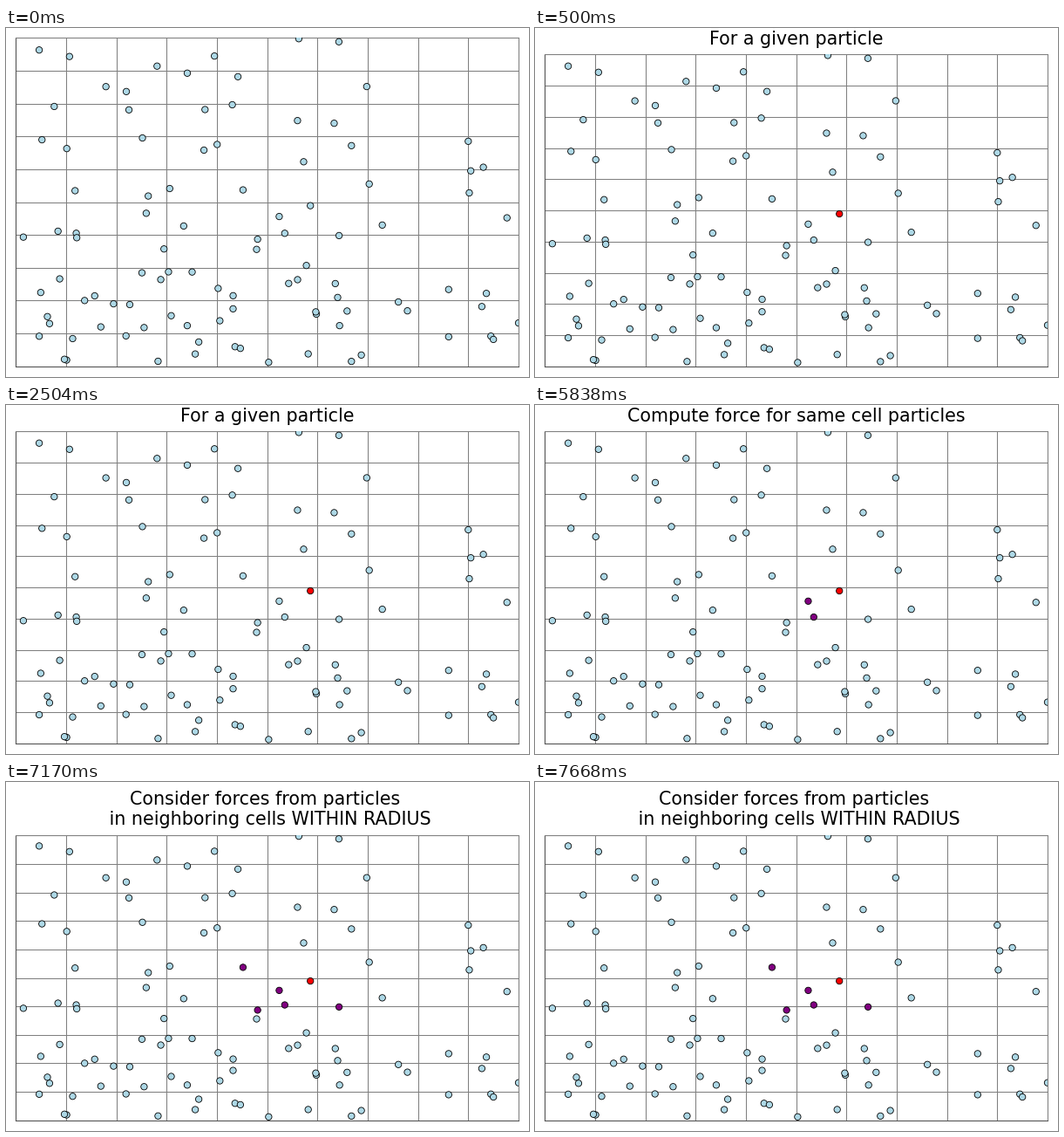
Animation of 600 by 400 pixels, one loop 8000 ms. Source, as a matplotlib script:

```python
import numpy as np
import matplotlib.pyplot as plt
from matplotlib.animation import FuncAnimation

W, H, DPI = 600, 400, 100
LEFT, RIGHT, BOTTOM = 11.2, 588.0, 387.8   # plot box in stage pixels
CELLS = 10
RADIUS = 1.5                               # in cell widths
STEP, LOOP = 20, 8000

# Start time, top of the plot box, title
STAGES = [
    (0, 11.2, ""),
    (500, 30.4, "For a given particle"),
    (3840, 30.4, "Compute force for same cell particles"),
    (7170, 61.2, "Consider forces from particles \n in neighboring cells WITHIN RADIUS"),
]

# The chosen particle comes first, then those in its own and the adjoining cells
CENTRE = [(5.86, 4.89), (5.24, 4.56), (5.35, 4.05), (4.52, 5.37),
          (4.81, 3.87), (4.79, 3.56), (6.43, 3.98), (5.78, 3.07)]
# Thinly filled right side
SPARSE = [(7.03, 5.55), (7.29, 4.30), (9.00, 6.85), (9.05, 5.95), (9.02, 5.28),
          (9.30, 6.06), (9.77, 4.52), (7.61, 1.96), (7.79, 1.69), (8.61, 2.34),
          (8.61, 0.90), (9.27, 1.82), (9.36, 2.22), (9.45, 0.92), (9.50, 0.82),
          (10.0, 1.32)]


def scatter_particles():
    """Two particles in each lower left cell, one in most upper left cells."""
    rng = np.random.default_rng(7)
    lower = [(x, y) for x in range(7) for y in range(3)] * 2
    upper = [(x, y) for x in range(7) for y in range(3, CELLS)
             if not (x >= 4 and y <= 5)]
    cells = np.array(lower + list(rng.permutation(upper)[:34]))
    return np.vstack([CENTRE, SPARSE, cells + rng.random(cells.shape)])


pos = scatter_particles()
focus = pos[0]
cell_gap = np.abs(np.floor(pos) - np.floor(focus)).max(axis=1)
near = np.hypot(*(pos - focus).T) < RADIUS


def colours(stage):
    c = np.full(len(pos), "lightblue", dtype=object)
    if stage >= 2:
        c[cell_gap == 0] = "purple"
    if stage >= 3:
        c[(cell_gap <= 1) & near] = "purple"
    if stage >= 1:
        c[0] = "red"
    return list(c)


fig = plt.figure(figsize=(W / DPI, H / DPI), dpi=DPI, facecolor="white")
ax = fig.add_axes([0, 0, 1, 1])
ax.set(xlim=(0, CELLS), ylim=(0, CELLS),
       xticks=range(CELLS + 1), yticks=range(CELLS + 1))
ax.tick_params(length=0, labelbottom=False, labelleft=False)
ax.grid(color="gray", lw=0.75, ls="-")
ax.set_axisbelow(True)
for side, spine in ax.spines.items():
    spine.set(linewidth=0.75, color="#505050" if side in ("left", "bottom") else "gray",
              zorder=0.6)
dots = ax.scatter(*pos.T, s=28, edgecolors="black", linewidths=0.6, zorder=3)
title = fig.text(0.5, 0.5, "", ha="center", va="bottom", size=14.9,
                 family="DejaVu Sans", linespacing=1.2)


def draw(i):
    t = (i + 0.5) * STEP
    stage = max(k for k, s in enumerate(STAGES) if s[0] <= t)
    _, top, text = STAGES[stage]
    ax.set_position([LEFT / W, 1 - BOTTOM / H, (RIGHT - LEFT) / W, (BOTTOM - top) / H])
    dots.set_facecolor(colours(stage))
    title.set_text(text)
    title.set_y(1 - (top - 7.8) / H)
    return dots, title


anim = FuncAnimation(fig, draw, frames=LOOP // STEP, interval=STEP, repeat=True, blit=False)
plt.show()
```
